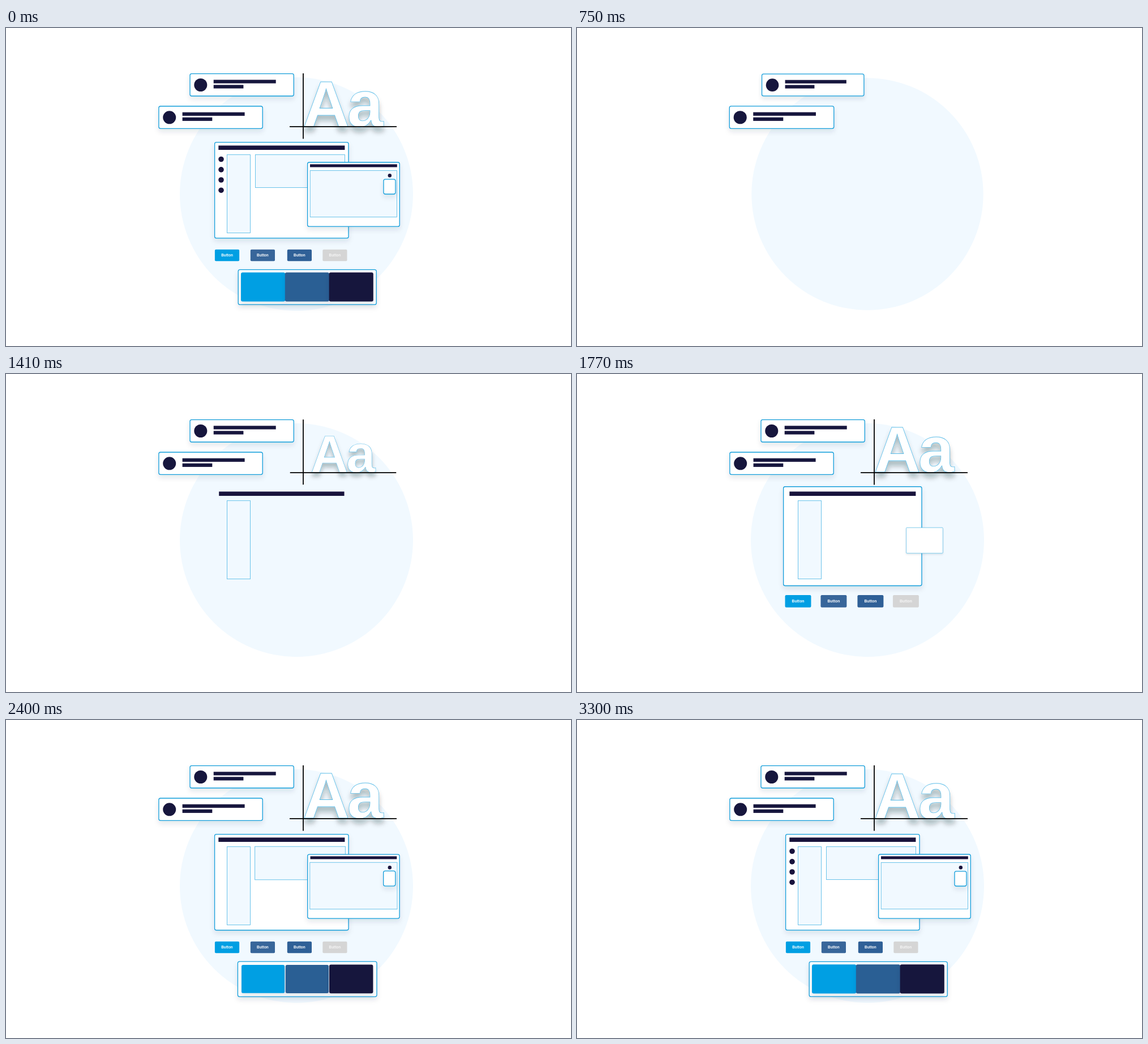
An HTML page that plays this animation: 998 px wide and 561 px high, repeating every 3.63 s.

```html
<!DOCTYPE html>
<html lang="en">
<head>
<meta charset="utf-8">
<title>Interface kit</title>
<style>
  html, body { margin: 0; width: 100%; height: 100%; overflow: hidden; background: #fff; }
  svg { display: block; width: 100%; height: 100%; }
  text { font-family: "Liberation Sans", Arial, sans-serif; font-weight: bold; }
</style>
</head>
<body>
<svg id="stage" viewBox="0 0 998 561">
  <defs>
    <filter id="soft" x="-30%" y="-60%" width="160%" height="240%">
      <feDropShadow dx="0" dy="5" stdDeviation="4" flood-color="#1b2a4a" flood-opacity=".11"/>
    </filter>
    <filter id="deep" x="-30%" y="-30%" width="160%" height="170%">
      <feDropShadow dx="0" dy="9" stdDeviation="4.5" flood-color="#101828" flood-opacity=".28"/>
    </filter>
  </defs>
</svg>
<script>
const LOOP = 3630, STEP = 30, REST = 3300;
const POP = 133;                              // usual growth time in ms
const INK = '#18133c', BLUE = '#009fe3', STEEL = '#2a5e94', PALE = '#f1f9ff';
const stage = document.getElementById('stage');
const parts = [];

function add(parent, tag, attrs, label) {
  const el = document.createElementNS('http://www.w3.org/2000/svg', tag);
  for (const k in attrs) el.setAttribute(k, attrs[k]);
  if (label) el.textContent = label;
  parent.appendChild(el);
  return el;
}

// A group that grows around (px, py), full size first reached at `key`
function part(px, py, key, dur = POP, filter) {
  const g = add(stage, 'g', filter ? { filter: `url(#${filter})` } : {});
  parts.push({ g, px, py, key, dur });
  return g;
}

function box(g, x1, y1, x2, y2, fill, attrs = {}) {
  return add(g, 'rect', { x: x1, y: y1, width: x2 - x1, height: y2 - y1, fill, ...attrs });
}
const disc = (g, cx, cy, r, fill) => add(g, 'circle', { cx, cy, r, fill });
const frame = { rx: 3, stroke: '#139edb', 'stroke-width': 1.3 };
const thin = { stroke: '#5cbde8', 'stroke-width': 0.9 };

function solid(key, dur, x1, y1, x2, y2, fill, attrs, filter) {
  const g = part((x1 + x2) / 2, (y1 + y2) / 2, key, dur, filter);
  box(g, x1, y1, x2, y2, fill, attrs);
  return g;
}

function card(x, y, key) {
  const g = part(x + 96, y + 29, key, POP, 'soft');
  box(g, x, y, x + 183.3, y + 39.3, '#fff', frame);
  disc(g, x + 18.8, y + 19.8, 11.5, INK);
  box(g, x + 41.7, y + 10.7, x + 151.7, y + 16.9, INK);
  box(g, x + 41.7, y + 19.7, x + 94.4, y + 25.9, INK);
}

// Backdrop and list cards
disc(part(513, 293, 540, 510), 513, 293, 206, PALE);
card(269.9, 138, 373);
card(325, 80.7, 560);

// Type sample with its guides
const type = part(595, 170, 1467, 290, 'deep');
for (const [ch, x] of [['A', 565.5], ['a', 634.5]])
  add(type, 'text', {
    x, y: 173.5, 'font-size': 115, 'text-anchor': 'middle',
    fill: '#fff', stroke: '#5cbde8', 'stroke-width': 0.8
  }, ch);
solid(1160, 400, 501, 173.2, 690, 175, '#000');
solid(1130, 370, 524.1, 80, 525.9, 195.5, '#000');

// Main window
solid(1635, POP, 368.6, 201.6, 605, 370.7, '#fff', frame, 'soft');
solid(1160, 400, 375.3, 207.4, 598.4, 215, INK);
solid(1250, 450, 390.5, 223.5, 431.5, 361.5, PALE, thin);
solid(2245, POP, 440.5, 223.5, 598.5, 281.5, PALE, thin);
[231.5, 249.9, 268, 286.2].forEach((y, i) =>
  disc(part(380, y, 2553 + i * 70), 380, y, 4.8, INK));

// Small window
solid(1850, POP, 532.6, 237, 695.2, 350.2, '#fff', frame, 'soft');
solid(2091, POP, 537, 240.4, 690.8, 245.5, INK);
solid(2015, POP, 537.2, 251.5, 690.5, 333.4, PALE, thin);
disc(part(677.8, 260.2, 2043), 677.8, 260.2, 3.2, INK);
box(part(696, 302, 2245, POP, 'soft'), 667, 266.8, 687.9, 293, '#fff', frame);

// Buttons
[
  [390.5, BLUE, '#fff'], [453.4, '#38669a', '#fff'],
  [518.4, '#2f6097', '#fff'], [580.9, '#d5d5d5', '#f6f6f6']
].forEach(([x, fill, ink]) => {
  const g = solid(1660, POP, x - 21.6, 390.7, x + 21.6, 411.2, fill, { rx: 2 });
  add(g, 'text', { x, y: 403.2, 'font-size': 6.4, 'text-anchor': 'middle', fill: ink }, 'Button');
});

// Palette
solid(2020, POP, 410.2, 426.3, 654.2, 487.9, '#fff', frame, 'soft');
[BLUE, STEEL, INK].forEach((c, i) => {
  const x = 415 + i * 77.8;
  solid(2160 + i * 30, POP, x, 431.3, x + 78.2, 482.5, c, { rx: 3 }, 'soft');
});

// Steady growth, then a damped ring whose size follows the growth speed
function grow(t, key, dur) {
  const late = (t - key) / 1000;
  if (late < 0) return Math.max(0, 1 + (t - key) / dur);
  return 1 + 23.3 / dur * Math.sin(6 * Math.PI * late) * Math.exp(-8 * late);
}

function draw(t) {
  const still = t < STEP || t >= REST;
  for (const { g, px, py, key, dur } of parts) {
    const s = still ? 1 : grow(t, key, dur);
    g.style.display = s > 0 ? '' : 'none';
    g.setAttribute('transform', `translate(${px} ${py}) scale(${s}) translate(${-px} ${-py})`);
  }
}

let begin = null;
function tick(now) {
  if (begin === null) begin = now;
  const t = Math.max(0, now - begin) % LOOP;
  draw(Math.floor(t / STEP) * STEP);
  requestAnimationFrame(tick);
}
draw(0);
requestAnimationFrame(tick);
</script>
</body>
</html>
```
